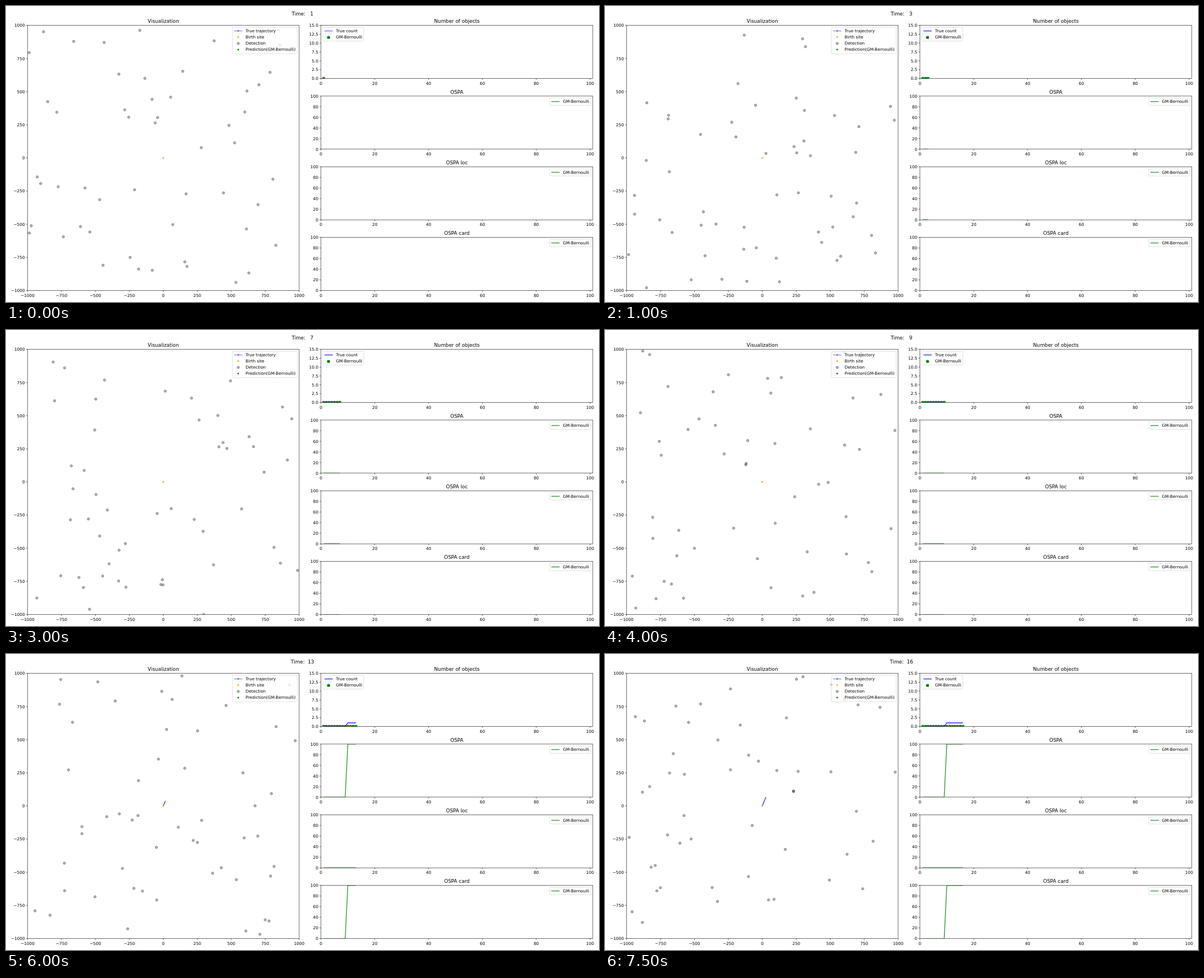
Animation of 1058 by 529 pixels, one loop 8000 ms. Source, as an HTML page with a canvas:

```html
<!DOCTYPE html>
<html lang="en">
<head>
<meta charset="utf-8">
<title>Tracking charts</title>
<style>
html, body { margin: 0; width: 100%; height: 100%; overflow: hidden; background: #fff; }
canvas { display: block; }
</style>
</head>
<body>
<canvas id="stage" width="1058" height="529"></canvas>
<script>
const ctx = document.getElementById('stage').getContext('2d');
const LOOP = 8000, STEP = 500, BIRTH = 10;
const PT = 0.735;
const FONT = '"DejaVu Sans", sans-serif';
const SMALL = 10 * PT, BIG = 12 * PT;
const THIN = 0.8 * PT, THICK = 1.5 * PT;
const GREEN = '#008000', BLUE = '#0000ff', ORANGE = 'rgb(255,160,30)';
const PALE_BLUE = 'rgba(0,0,255,0.6)';

const map = { x: 38.4, y: 34.6, w: 484.6, h: 473.9, x0: -1000, x1: 1000, y0: -1000, y1: 1000 };
const chart = (row, y1) =>
  ({ x: 561.9, y: 34.6 + 126.33 * row, w: 485, h: 94.9, x0: 0, x1: 101, y0: 0, y1 });
const count = chart(0, 15);
const errors = [
  { ax: chart(1, 100), title: 'OSPA', jumps: true },
  { ax: chart(2, 100), title: 'OSPA loc', jumps: false },
  { ax: chart(3, 100), title: 'OSPA card', jumps: true }
];

const px = (ax, v) => ax.x + ax.w * (v - ax.x0) / (ax.x1 - ax.x0);
const py = (ax, v) => ax.y + ax.h * (ax.y1 - v) / (ax.y1 - ax.y0);
const label = v => String(v).replace('-', '\u2212');

function random(seed) {
  let s = seed >>> 0;
  return () => {
    s = (s + 0x6D2B79F5) | 0;
    let t = Math.imul(s ^ (s >>> 15), s | 1);
    t ^= t + Math.imul(t ^ (t >>> 7), t | 61);
    return ((t ^ (t >>> 14)) >>> 0) / 4294967296;
  };
}

function text(str, x, y, size = SMALL, align = 'center') {
  ctx.font = `${size}px ${FONT}`;
  ctx.textAlign = align;
  ctx.fillStyle = '#000';
  ctx.fillText(str, x, y);
}

function line(points, color, width) {
  ctx.beginPath();
  points.forEach(([x, y]) => ctx.lineTo(x, y));
  ctx.strokeStyle = color;
  ctx.lineWidth = width;
  ctx.stroke();
}

function dot(x, y, r, color) {
  ctx.beginPath();
  ctx.arc(x, y, r, 0, 2 * Math.PI);
  ctx.fillStyle = color;
  ctx.fill();
}

const birthDot = (x, y) => dot(x, y, 1.45, ORANGE);
const estimateDot = (x, y) => dot(x, y, 2.7, GREEN);

function detection(x, y) {
  dot(x, y, 3 * PT, 'rgba(0,0,0,0.3)');
  ctx.strokeStyle = 'rgba(0,0,0,0.3)';
  ctx.lineWidth = 1;
  ctx.stroke();
}

function inside(ax, draw) {
  ctx.save();
  ctx.beginPath();
  ctx.rect(ax.x, ax.y, ax.w, ax.h);
  ctx.clip();
  draw();
  ctx.restore();
}

function frame(ax, title, xStep, yStep, digits = 0) {
  const bottom = ax.y + ax.h, tickLen = 3.5 * PT;
  ctx.strokeStyle = '#000';
  ctx.lineWidth = THIN;
  ctx.strokeRect(ax.x, ax.y, ax.w, ax.h);
  for (let v = ax.x0; v <= ax.x1; v += xStep) {
    const x = px(ax, v);
    line([[x, bottom], [x, bottom + tickLen]], '#000', THIN);
    text(label(v), x, bottom + 11.1);
  }
  for (let v = ax.y0; v <= ax.y1; v += yStep) {
    const y = py(ax, v);
    line([[ax.x - tickLen, y], [ax.x, y]], '#000', THIN);
    text(label(v.toFixed(digits)), ax.x - 4.8, y + 2.7, SMALL, 'right');
  }
  text(title, ax.x + ax.w / 2, ax.y - 4.4, BIG);
}

// Each row is [name, function drawing its sample around (x, y)]
function legend(x, y, w, h, rows) {
  ctx.beginPath();
  ctx.roundRect(x, y, w, h, 1.5);
  ctx.fillStyle = 'rgba(255,255,255,0.8)';
  ctx.fill();
  ctx.strokeStyle = 'rgba(204,204,204,0.8)';
  ctx.lineWidth = PT;
  ctx.stroke();
  rows.forEach(([name, sample], i) => {
    const mid = y + 6.4 + i * 11.15;
    sample(x + 10.3, mid);
    text(name, x + 23.6, mid + 2.4, SMALL, 'left');
  });
}

const stroke = (color, width) => (x, y) => line([[x - 7.4, y], [x + 7.4, y]], color, width);

function trackSample(x, y) {
  stroke(PALE_BLUE, 1)(x, y);
  dot(x, y, 1, BLUE);
}

function drawMap(step) {
  const rnd = random(step * 7919);
  const total = 46 + Math.floor(rnd() * 10);
  const track = [];
  for (let t = BIRTH; t <= step; t++) {
    const age = t - BIRTH;
    track.push([px(map, 2 + 3.8 * age), py(map, 6 + 9.6 * age)]);
  }
  inside(map, () => {
    for (let i = 0; i < total; i++) {
      detection(map.x + rnd() * map.w, map.y + rnd() * map.h);
    }
    line(track, 'rgba(0,0,255,0.85)', 0.9);
    track.forEach(([x, y]) => dot(x, y, 0.8, BLUE));
    birthDot(px(map, 0), py(map, 0));
  });
  frame(map, 'Visualization', 250, 250);
  legend(404, 38.2, 115.6, 47, [
    ['True trajectory', trackSample],
    ['Birth site', birthDot],
    ['Detection', detection],
    ['Prediction(GM-Bernoulli)', (x, y) => dot(x, y, 1.45, GREEN)]
  ]);
}

function drawCount(step) {
  const truth = [];
  inside(count, () => {
    for (let t = 1; t <= step; t++) {
      estimateDot(px(count, t), py(count, 0));
      truth.push([px(count, t), py(count, t < BIRTH ? 0 : 1)]);
    }
    line(truth, BLUE, THICK);
  });
  frame(count, 'Number of objects', 20, 2.5, 1);
  legend(565.2, 38.2, 73, 24.5, [
    ['True count', stroke(step === 1 ? 'rgba(0,0,255,0.7)' : BLUE, THICK)],
    ['GM-Bernoulli', (x, y) => estimateDot(x, y + 0.4)]
  ]);
}

function drawError({ ax, title, jumps }, step) {
  const points = [];
  for (let t = 1; t <= step; t++) {
    points.push([px(ax, t), py(ax, jumps && t >= BIRTH ? 100 : 0)]);
  }
  inside(ax, () => line(points, GREEN, THICK));
  frame(ax, title, 20, 20);
  legend(970, ax.y + 3.5, 73.6, 13, [['GM-Bernoulli', stroke(GREEN, THICK)]]);
}

let shown = 0;
function tick() {
  const step = 1 + Math.floor(performance.now() % LOOP / STEP);
  if (step !== shown) {
    shown = step;
    ctx.fillStyle = '#fff';
    ctx.fillRect(0, 0, 1058, 529);
    text('Time: ' + String(step).padStart(3), 529, 17.2, BIG);
    drawMap(step);
    drawCount(step);
    errors.forEach(e => drawError(e, step));
  }
  requestAnimationFrame(tick);
}
tick();
</script>
</body>
</html>
```
